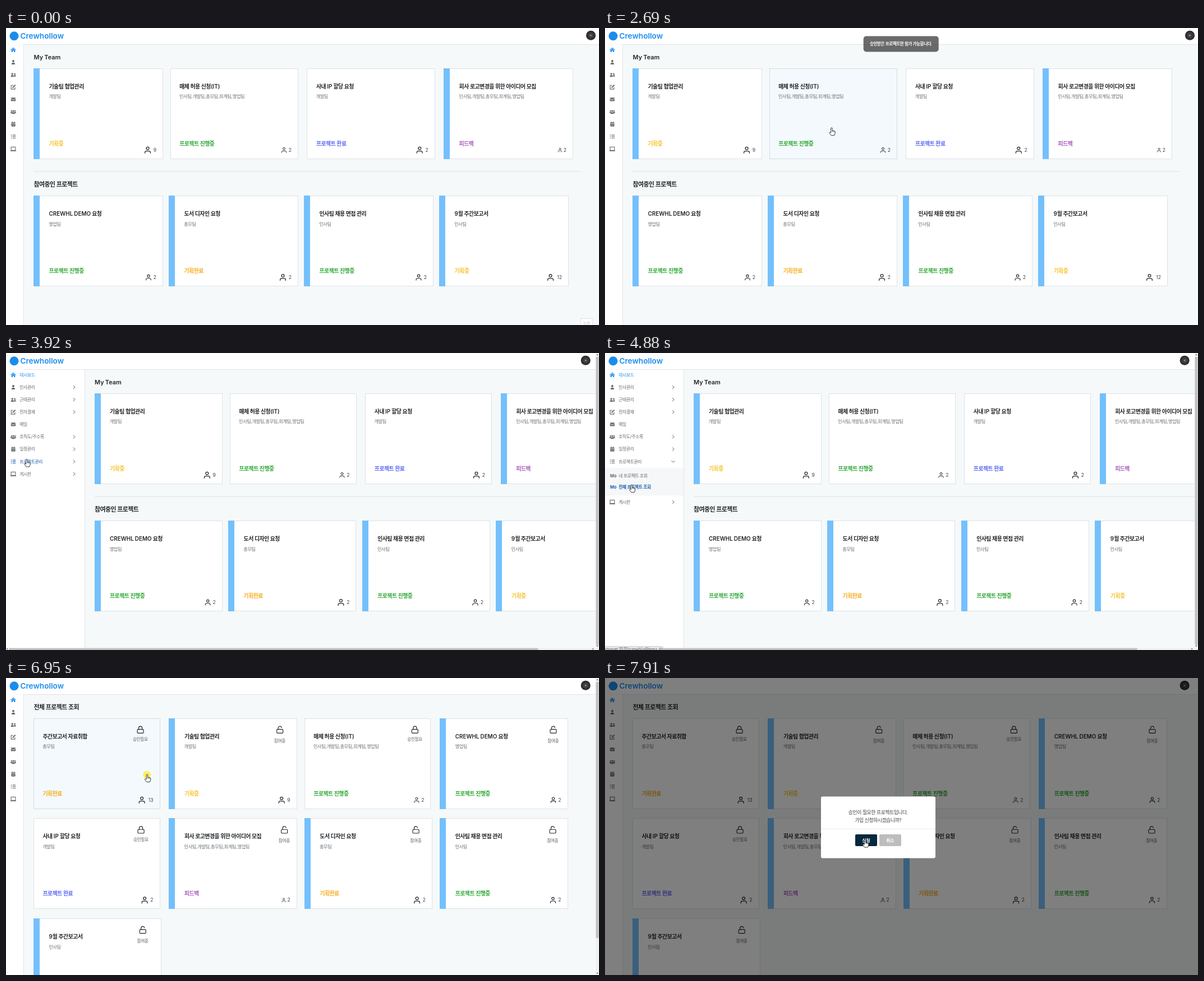
Recreate the animation shown at these times as an HTML page. Size 1057 px wide and 530 px high, loop 8000 ms.

```html
<!DOCTYPE html>
<html lang="ko">
<head>
<meta charset="utf-8">
<title>Project dashboard</title>
<style>
html, body { margin: 0; width: 100%; height: 100%; overflow: hidden; background: #f5f9fa; }
svg { display: block; font-family: Inter, "Noto Sans CJK KR", "Noto Sans CJK", sans-serif; }
text { word-spacing: -.04em; }
.k { letter-spacing: -.05em; }
</style>
</head>
<body>
<svg id="stage" width="1057" height="530" viewBox="0 0 1057 530"></svg>
<script>
const LOOP = 8000, W = 1057, H = 530;
const BLUE = '#1c8ceb', INK = '#212529', GRAY = '#6b6f73', LINE = '#dee2e6';

// Moments of the story
const TOAST_IN = 1210, TOAST_OUT = 2690, MENU = 3580, SUBMENU = 4380, PAGE2 = 5220, MODAL = 7020;
const CLICKS = [1140, 4260, 5080, 6950], CLICK_TIME = 70;

// title, team, status, people, person icon size, joined, lock distance from right edge
const projects = [
  ['주간보고서 자료취합', '총무팀', '기획완료', 13, 11, 0, 34.5],
  ['기술팀 협업관리', '개발팀', '기획중', 9, 11, 1, 30],
  ['매체 허용 신청(IT)', '인사팀,개발팀,총무팀,회계팀,영업팀', '프로젝트 진행중', 2, 9, 0, 28],
  ['CREWHL DEMO 요청', '영업팀', '프로젝트 진행중', 2, 9.5, 1, 25.5],
  ['사내 IP 할당 요청', '개발팀', '프로젝트 완료', 2, 11, 0, 33.5],
  ['회사 로고변경을 위한 아이디어 모집', '인사팀,개발팀,총무팀,회계팀,영업팀', '피드백', 2, 7, 1, 22],
  ['도서 디자인 요청', '총무팀', '기획완료', 2, 11, 1, 29],
  ['인사팀 채용 면접 관리', '인사팀', '프로젝트 진행중', 2, 10, 1, 26.5],
  ['9월 주간보고서', '인사팀', '기획중', 12, 11, 1, 33]
];
const statusColor = {
  '기획중': '#f6c32c', '기획완료': '#f7ac1e', '프로젝트 진행중': '#2fa836',
  '프로젝트 완료': '#5b68f5', '피드백': '#a95dbf'
};
const menu = ['대시보드', '인사관리', '근태관리', '전자결재', '메일', '조직도/주소록', '일정관리', '프로젝트관리', '게시판'];

// start, end, control point, destination
const moves = [
  [480, 1100, 600, 330, 404, 178],
  [2750, 3380, 200, 222, 14, 193],
  [3700, 4200, 30, 188, 48, 190],
  [4580, 4860, 52, 215, 47.5, 235],
  [5680, 6420, 180, 324.6, 251.5, 172],
  [7480, 7910, 370, 250, 463.5, 288.5]
];

const clamp = u => Math.max(0, Math.min(1, u));
const part = (t, from, time) => clamp((t - from) / time);
const smooth = u => u * u * (3 - 2 * u);

const rect = (x, y, w, h, fill, more = '') =>
  `<rect x="${x}" y="${y}" width="${Math.max(0, w)}" height="${Math.max(0, h)}" fill="${fill}" ${more}/>`;
const path = (d, more = '') => `<path d="${d}" ${more}/>`;
const pen = (color, width) => `fill="none" stroke="${color}" stroke-width="${width}"`;
const group = (x, y, body, more = '') => `<g transform="translate(${x} ${y})" ${more}>${body}</g>`;
const dot = (x, y, r, more = '') => `<circle cx="${x}" cy="${y}" r="${r}" ${more}/>`;
const text = (x, y, s, size, fill = INK, weight = 400, anchor = 'start') =>
  `<text x="${x}" y="${y}" font-size="${size}" fill="${fill}" font-weight="${weight}" text-anchor="${anchor}">` +
  String(s).replace(/[가-힣]+/g, '<tspan class="k">$&</tspan>') + '</text>';

const bust = (x, y, r) => dot(x, y, r) +
  path(`M${x - r * 1.6} ${y + r * 3}a${r * 1.6} ${r * 1.7} 0 0 1 ${r * 3.2} 0z`);
const icons = c => [
  path('M-5 0L0-4.3 5 0 4.2 .8 0-2.8-4.2 .8zM-3.3 .9L0-1.9 3.3 .9V4H1V1.4H-1V4H-3.3z'),
  bust(0, -2, 2),
  bust(-1.8, -1.3, 1.7) + bust(2.7, -1, 1.4),
  path('M0-3H-3.8V3.8H3V.5', pen(c, 1.1)) + path('M-1.3 1.3L3.7-3.7', pen(c, 2)),
  rect(-4.2, -3.2, 8.4, 6.4, c, 'rx="1"') + path('M-4.2-1.6L0 1.2 4.2-1.6', pen('#fff', .9)),
  bust(-3.2, -1.2, 1.2) + bust(3.2, -1.2, 1.2) + bust(0, -1.4, 1.7),
  rect(-3.6, -3.4, 7.2, 7.6, c, 'rx="1"') + path('M-1.8-4.6V-2M1.8-4.6V-2', pen(c, 1.2)) +
    path('M-3.6-1.5H3.6M-1.7 1.2L-.4 2.5 2 0', pen('#fff', .8)),
  path('M-4.2-2.6H-2.6M-4.2 .2H-2.6M-4.2 3H-2.6M-1.2-2.6H4.2M-1.2 .2H4.2M-1.2 3H4.2', pen(c, 1.1)),
  rect(-3.9, -3.4, 7.8, 6, 'none', `stroke="${c}" stroke-width="1.1"`) + path('M-5 3.5H5', pen(c, 1.2))
];

function person(cx, cy, size) {
  const k = size / 18;
  return `<g transform="translate(${cx} ${cy}) scale(${k}) translate(-12 -12)" ${pen(INK, 2)} stroke-linecap="round">` +
    path('M20 21v-2a4 4 0 0 0-4-4H8a4 4 0 0 0-4 4v2') + dot(12, 7, 4) + '</g>';
}

function lock(cx, cy, open) {
  return `<g transform="translate(${cx} ${cy}) scale(.61) translate(-12 -12)" ${pen(INK, 1.9)} stroke-linecap="round">` +
    rect(3, 11, 18, 11, 'none', 'rx="2"') +
    path(open ? 'M7 11V7a5 5 0 0 1 9.9-1' : 'M7 11V7a5 5 0 0 1 10 0v4') + '</g>';
}

function mouseAt(t) {
  let x = 856, y = 436;
  for (const [from, to, cx, cy, ex, ey] of moves) {
    if (t < from) break;
    const u = 1 - (1 - part(t, from, to - from)) ** 2, v = 1 - u;
    x = v * v * x + 2 * v * u * cx + u * u * ex;
    y = v * v * y + 2 * v * u * cy + u * u * ey;
  }
  return { x, y, hand: false, shown: t >= 480 };
}

function card(project, x, y, barWidth, mouse, active, locks) {
  const [title, team, status, people, size, joined, lockGap] = project;
  const w = joined ? barWidth : barWidth - 2.7, right = x + w, tx = x + (joined ? 27 : 16);
  const over = active && mouse.x > x && mouse.x < right && mouse.y > y && mouse.y < y + 162;
  if (over) mouse.hand = true;
  // Boxes sit on whole pixels, text does not
  const left = Math.floor(x), top = Math.floor(y), edge = Math.floor(right);
  const lx = right - lockGap, digits = String(people).length * 5;
  return rect(left + .5, top + .5, edge - left, 161, over ? '#f4f9fd' : '#fff', `stroke="${over ? '#d3dde6' : LINE}"`) +
    (joined ? rect(left, top, 11, 162, '#74c0fc') : '') +
    text(tx, y + 35.2, title, 9.9, INK, 600) +
    text(tx - .3, y + 53, team, 8.2, GRAY) +
    text(tx, y + 137.3, status, 9.9, statusColor[status], 600) +
    person(right - 11.5 - digits - size * .95, y + 145.5, size) +
    text(right - 11.5, y + 148.4, people, 8.6, '#444', 400, 'end') +
    (locks ? lock(lx, y + 20, joined) +
      text(lx - .3, y + (joined ? 42.2 : 40), joined ? '참여중' : '승인필요', 7.7, '#5c6064', 400, 'middle') : '');
}

function dashboard(shift, narrow, mouse, active) {
  const x = 49.5 + shift, barWidth = narrow ? 227.3 : 230;
  const row = (list, y, step) =>
    list.map((n, i) => card(projects[n], x + i * step, y, barWidth, mouse, active)).join('');
  return text(x, 55.7, 'My Team', 10.9, INK, 600) +
    row([1, 2, 4, 5], 72.3, narrow ? 241.4 : 243.7) +
    rect(x, 255.5, narrow ? 966 : 975, 1, LINE) +
    text(x, 283, '참여중인 프로젝트', 10.9, INK, 600) +
    row([3, 6, 7, 8], 299.6, narrow ? 238.6 : 241);
}

function allProjects(mouse, active) {
  return text(49.5, 55.7, '전체 프로젝트 조회', 10.9, INK, 600) +
    projects.map((p, i) =>
      card(p, 49.5 + i % 4 * 241.4, 72.3 + (i >> 2) * 178.6, 227.3, mouse, active, true)).join('');
}

function sidebar(t, width, open, sub, mouse) {
  const inside = mouse.shown && mouse.x < width && mouse.y > 30;
  if (inside) mouse.hand = true;
  const near = y => inside && Math.abs(mouse.y - y) < 10;
  const subHeight = 50 * sub;
  let s = rect(0, 30, width, 500, '#fff') + rect(width, 29, 1, 501, '#e1e5e8');
  let labels = '';
  menu.forEach((name, i) => {
    const y = 39 + i * 22.1 + (i === 8 ? subHeight : 0);
    const color = i === 0 ? BLUE : near(y) && !(sub && mouse.y > 205) ? '#1c5fb0' : '#666a6e';
    s += group(13, y, icons(color)[i], `fill="${color}"`);
    labels += text(24.3, y + 2.8, name, 7.8, color);
    if (i && i !== 4) {
      const turn = i === 7 ? 90 * sub : 0;
      labels += `<g transform="translate(121.5 ${y}) rotate(${turn})">` + path('M-1.5-3L1.5 0-1.5 3', pen('#555', 1)) + '</g>';
    }
  });
  if (sub) {
    labels += `<clipPath id="sub">${rect(0, 204.5, width, subHeight, '#000')}</clipPath><g clip-path="url(#sub)">` +
      rect(0, 204.5, width, 50, '#f6f7f8');
    [['내 프로젝트 조회', 219], ['전체 프로젝트 조회', 239.5]].forEach(([name, y]) => {
      const on = near(y), color = on ? '#1c5fb0' : '#666a6e';
      labels += text(9, y + 2.8, 'Mo', 7.5, color, 700) + text(24.3, y + 2.8, name, 7.8, color, on ? 600 : 400);
    });
    labels += '</g>';
  }
  return s + `<clipPath id="side">${rect(0, 30, width, 500, '#000')}</clipPath>` +
    `<g clip-path="url(#side)" opacity="${clamp(open * 2)}">${labels}</g>`;
}

function header(avatarX) {
  return rect(0, 0, W, 29, '#fff') + rect(31, 29, W, 1, '#e1e5e8') +
    dot(14.5, 14.3, 8, `fill="${BLUE}"`) +
    text(25.5, 19.3, 'Crewhollow', 13.6, BLUE, 600) +
    '<radialGradient id="photo"><stop offset="0" stop-color="#c9c4c0"/><stop offset=".2" stop-color="#4a4848"/>' +
    '<stop offset="1" stop-color="#262527"/></radialGradient>' +
    dot(avatarX, 13.2, 8.5, 'fill="url(#photo)"');
}

function scrollbars(thumbEnd, shift, across) {
  let s = rect(1051, 0, 6, H, '#f1f1f1') + rect(1051.5, 7, 5, thumbEnd - 7, '#c1c1c1') +
    path(`M1052.3 4h3.4l-1.7-2zM1052.3 ${across ? 522 : 526}h3.4l-1.7 2z`, 'fill="#505050"');
  if (across) {
    s += rect(0, 526, W, 4, '#f1f1f1') + rect(5, 526.7, 1041 * 1051 / (1051 + shift), 3.3, '#c1c1c1') +
      path('M3 526.5v3l-2-1.5zM1045.5 526.5v3l2-1.5z', 'fill="#505050"');
  }
  return s;
}

function toast(t) {
  const rise = smooth(part(t, TOAST_IN, 460));
  const seen = rise * (1 - part(t, TOAST_OUT, 400));
  if (!seen) return '';
  return group(0, 5 * (1 - rise), rect(460.7, 14.5, 134, 28, '#000', 'rx="5" fill-opacity=".58"') +
    text(527.8, 31.2, '승인받은 프로젝트만 참가 가능합니다.', 7.5, '#fff', 600, 'middle'), `opacity="${seen}"`);
}

function dialog(mouse) {
  if (mouse.x > 446 && mouse.x < 528 && mouse.y > 279 && mouse.y < 300) mouse.hand = true;
  return rect(0, 0, W, H, '#000', 'opacity=".5"') +
    rect(385, 211.5, 204, 110, '#fff', 'rx="3"') +
    text(487, 243.3, '승인이 필요한 프로젝트입니다.', 8.8, '#444', 400, 'middle') +
    text(487, 256.8, '가입 신청하시겠습니까?', 8.8, '#444', 400, 'middle') +
    rect(385, 269, 204, 1, '#ececec') +
    rect(446, 279, 39, 21, '#06293f', 'rx="2"') + text(465.3, 292.5, '신청', 8.2, '#fff', 600, 'middle') +
    rect(489, 279, 39, 21, '#bdbdbd', 'rx="2"') + text(508.3, 292.5, '취소', 8.2, '#fff', 600, 'middle');
}

function cursor(t, { x, y, hand, shown }) {
  if (!shown) return '';
  const click = CLICKS.some(c => t >= c && t < c + CLICK_TIME);
  const shape = hand
    ? 'M-1.3 1C-1.3-.5 1.2-.5 1.2 1V5.2L5 6C6.3 6.3 6.6 7 6.4 8L5.8 11 4.8 13.6H-.8L-3.8 9.6C-4.6 8.4-3.2 7.4-2.2 8.2L-1.3 9z'
    : 'M0 0V12L2.8 9.3 4.6 13.4 6.4 12.6 4.6 8.7H8.5z';
  return group(x, y, (click ? dot(-.3, .8, 7, 'fill="#fbee3c" opacity=".8"') : '') +
    path(shape, 'fill="#fff" stroke="#222" stroke-width=".9" stroke-linejoin="round"') +
    (hand ? path('M1.2 5.2V7.6M3.1 5.8V7.8M4.9 6.2V8', pen('#222', .6)) : ''));
}

function draw(t) {
  const first = t < PAGE2, opened = t >= MENU && first, modal = t >= MODAL;
  const mouse = mouseAt(t);
  const open = opened ? smooth(part(t, MENU, 320)) : 0;
  const shift = opened ? 108.5 * part(t, MENU, 310) : 0;
  const sub = opened ? smooth(part(t, SUBMENU, 250)) : 0;
  const width = 31 + 109 * open;
  const active = mouse.shown && !modal && mouse.x > width;

  let s = rect(0, 0, W, H, '#f5f9fa');
  s += first ? dashboard(shift, opened, mouse, active) : allProjects(mouse, active);
  s += header(t < MENU ? 1042.5 : 1033.2) + sidebar(t, width, open, sub, mouse);
  if (t >= MENU && !modal) s += scrollbars(first ? 521 : 464, shift, first);
  if (sub === 1 && mouse.y > 209) {
    s += rect(-4, 523.5, 108, 12, '#e4e7ea', 'rx="3" stroke="#cfd3d6"') +
      text(-1, 531.2, 'ntranet:7070/crewhl/allItems.do', 7, '#555');
  }
  if (t < 160) {
    s += `<g opacity="${1 - part(t, 70, 90)}">` + rect(1024.5, 518.5, 20.5, 14, '#fff', `stroke="${LINE}"`) +
      text(1034.7, 528.5, '녹화', 7.3, '#c4c7ca', 400, 'middle') + '</g>';
  }
  s += toast(t);
  if (modal) s += dialog(mouse);
  return s + cursor(t, mouse);
}

const stage = document.getElementById('stage');
function tick(now) {
  stage.innerHTML = draw(now % LOOP);
  requestAnimationFrame(tick);
}
tick(0);
</script>
</body>
</html>
```
